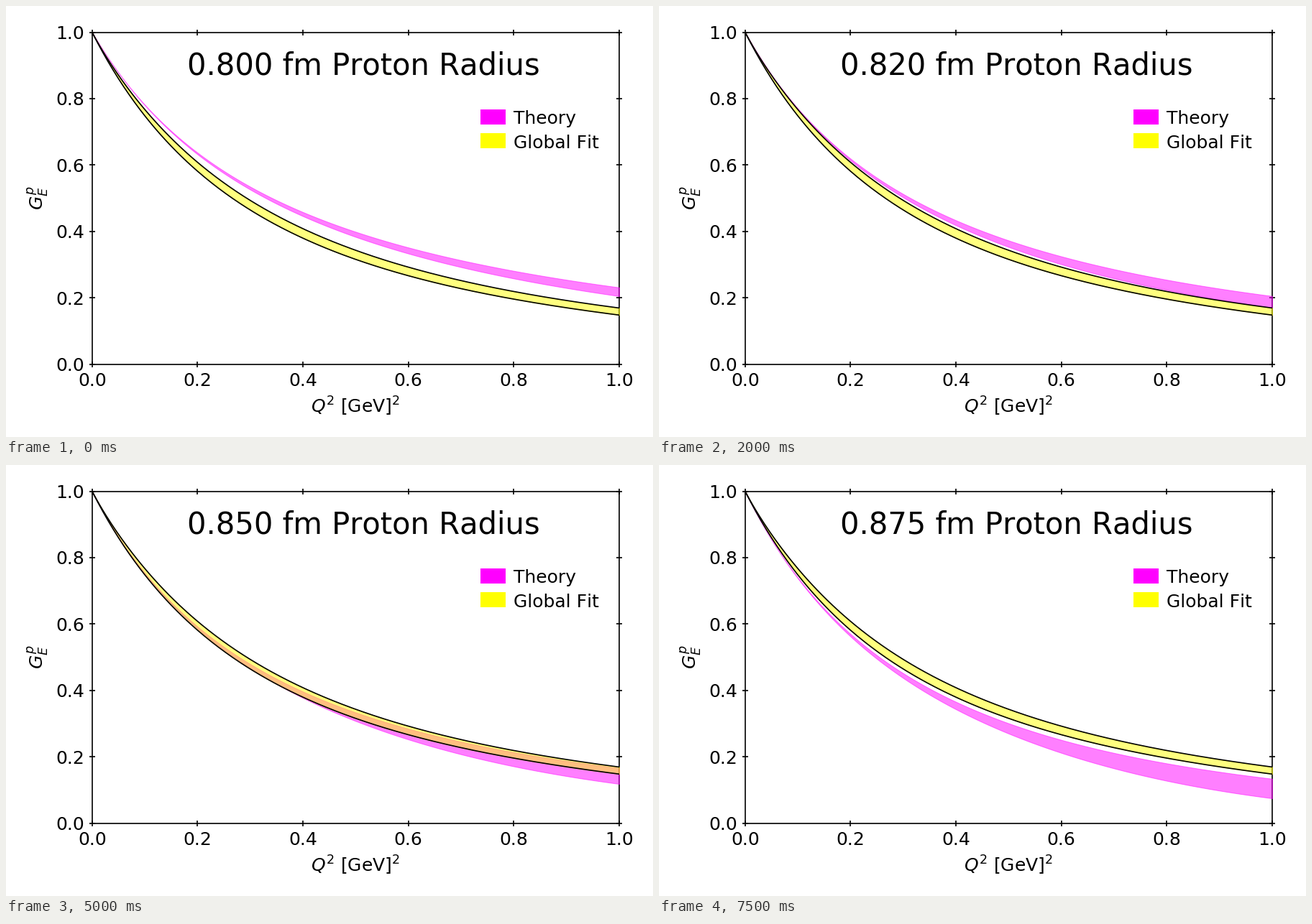
Write a matplotlib script that moves like this. It is 900 px wide and 600 px high and loops after 8000 ms.

```python
import numpy as np
import matplotlib.pyplot as plt
from matplotlib.animation import FuncAnimation
from matplotlib.patches import Rectangle

W, H, DPI = 900, 600, 150
FRAMES, INTERVAL = 16, 500
R_MIN, R_MAX, R_STEP = 0.800, 0.875, 0.005

plt.rcParams.update({
    "font.family": "DejaVu Sans",
    "font.size": 12,
    "mathtext.fontset": "dejavusans",
    "text.kerning_factor": 6,
})

q2 = np.linspace(0, 1, 301)


def form_factor(*coef):
    """1 / (1 + c0 x + c1 x^2 + ...), equal to one at x = 0."""
    return 1 / (1 + sum(c * q2 ** (i + 1) for i, c in enumerate(coef)))


def slope(radius):
    """Slope at the origin in GeV^-2 for a charge radius in fm."""
    return radius ** 2 / (6 * 0.0389379)


# Theory band edges at both ends of the radius range
top_a = form_factor(slope(R_MIN), 0.516, 0.07)
low_a = form_factor(slope(R_MIN), 0.77, 0.37)
top_b = form_factor(slope(R_MAX), 2.29, 0.91)
low_b = form_factor(slope(R_MAX), 2.55, 2.4, 0, 4.13)

# Global fit, pinched near the origin
fit_top = form_factor(2.817 + 0.2 * np.exp(-q2 / 0.04), 2.012, 0, 0, 0.08)
fit_low = form_factor(3.11 + 0.04 * np.exp(-q2 / 0.08), 2.435, 0, 0, 0, 0.215)


def band_verts(low, top):
    return np.column_stack([np.r_[q2, q2[::-1]], np.r_[low, top[::-1]]])


fig = plt.figure(figsize=(W / DPI, H / DPI), dpi=DPI, facecolor="white")
ax = fig.add_axes([119.8 / W, 101.4 / H, 733.2 / W, 462 / H])
ax.set(xlim=(0, 1), ylim=(0, 1))
ax.set_xlabel(r"$Q^2$ [GeV]$^2$")
ax.set_ylabel(r"$G_E^p$")
ax.tick_params(direction="inout", top=True, right=True)

# Bands lie above the axes frame
theory = ax.fill_between(q2, low_a, top_a, color="magenta", alpha=0.5,
                         lw=0.5, zorder=3)
ax.fill_between(q2, fit_low, fit_top, color="yellow", alpha=0.5,
                lw=0.5, zorder=4)
for edge in (fit_low, fit_top):
    ax.plot(q2, edge, color="black", lw=0.8, zorder=5)

title = ax.text(0.18, 0.873, "", fontsize=20)


def legend_row(y, base, color, label):
    fig.add_artist(Rectangle((660 / W, 1 - (y + 21) / H), 35 / W, 21 / H,
                             color=color, lw=0))
    fig.text(706 / W, 1 - base / H, label)


legend_row(144, 164, "magenta", "Theory")
legend_row(177, 198, "yellow", "Global Fit")


def update(k):
    t = k / (FRAMES - 1)
    low = low_a + (low_b - low_a) * t
    top = top_a + (top_b - top_a) * t
    theory.set_verts([band_verts(low, top)])
    title.set_text(f"{R_MIN + R_STEP * k:.3f} fm Proton Radius")
    return theory, title


anim = FuncAnimation(fig, update, frames=FRAMES, interval=INTERVAL,
                     repeat=True, repeat_delay=0, blit=False)
plt.show()
```
